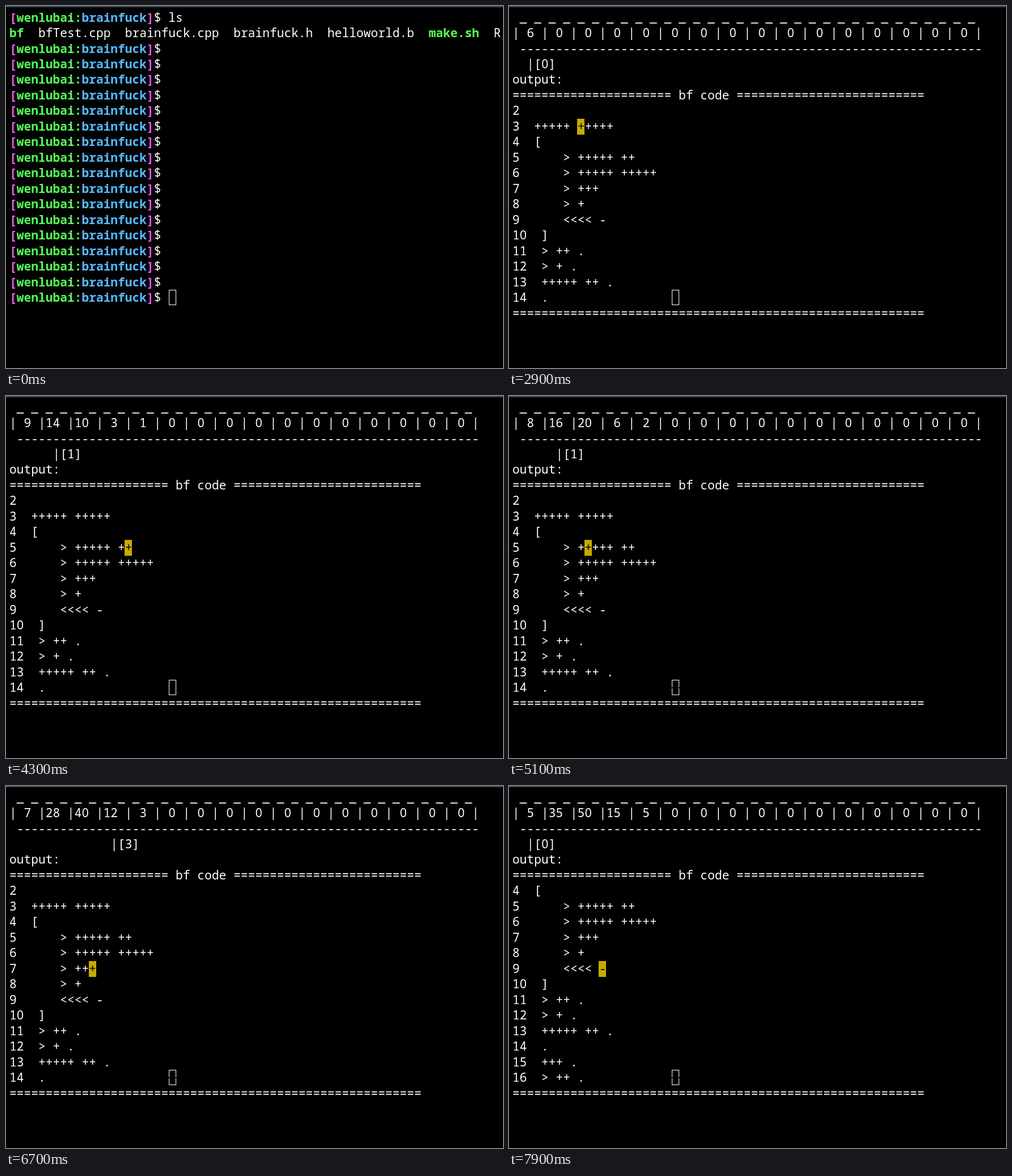
Recreate the animation shown at these times as an HTML page with a canvas. Size 876 by 639 pixels, loop 8 s.

```html
<!DOCTYPE html>
<html lang="en">
<head>
<meta charset="utf-8">
<title>Brainfuck visualizer</title>
<style>
html, body { margin: 0; width: 100%; height: 100%; overflow: hidden; background: #000; }
canvas { display: block; }
</style>
</head>
<body>
<canvas id="screen" width="876" height="639"></canvas>
<script>
const ctx = document.getElementById('screen').getContext('2d');
const LOOP = 8000, RUN_AT = 2800, FRAME = 100;
const COL = 12.74, ROW = 27.47, LEFT = 6, BASE = 27.6, SIZE = 21.2;
const WHITE = '#ffffff', GREEN = '#55ff55', BLUE = '#55bbff', PINK = '#ff55ff', GOLD = '#c8aa00';

// Program text; the first entry is line 2.
const FIRST = 2, VISIBLE = 13;
const code = [
  '',
  '+++++ +++++',
  '[',
  '    > +++++ ++',
  '    > +++++ +++++',
  '    > +++',
  '    > +',
  '    <<<< -',
  ']',
  '> ++ .',
  '> + .',
  '+++++ ++ .',
  '.',
  '+++ .',
  '> ++ .',
  '<< +++++ +++++ +++++ .'
];
const ops = code.flatMap((text, i) =>
  [...text].map((op, col) => ({ op, col, line: i + FIRST })).filter(o => o.op !== ' '));
const loopStart = ops.findIndex(o => o.op === '[');

const x = col => LEFT + col * COL;
const baseline = row => Math.round(BASE + row * ROW);

// Writes text on the character grid and returns the next column.
function put(row, col, text, color = WHITE, bold = false) {
  ctx.fillStyle = color;
  for (const ch of text) {
    // Plain zero without a slash.
    const family = ch === '0' ? '"Noto Sans", sans-serif' : '"Noto Sans Mono", monospace';
    ctx.font = `${bold ? 'bold ' : ''}${SIZE}px ${family}`;
    if (ch !== ' ') ctx.fillText(ch, x(col + 0.5), baseline(row));
    col++;
  }
  return col;
}

function prompt(row, command = '') {
  let col = put(row, 0, '[', PINK, true);
  col = put(row, col, 'wenlubai:', GREEN, true);
  col = put(row, col, 'brainfuck', BLUE, true);
  col = put(row, col, ']', PINK, true);
  put(row, col, '$ ' + command);
}

function cursor(broken) {
  ctx.strokeStyle = WHITE;
  ctx.lineWidth = 1;
  ctx.strokeRect(287.5, 501.5, 12, 26);
  if (broken) {
    ctx.fillStyle = '#000';
    ctx.fillRect(287, 514, 13, 2);
  }
}

function shell(t) {
  const typed = [[2300, './bf helloworld.b'], [2200, './bf he'], [2100, './bf h'],
    [1500, './bf'], [1000, './b'], [700, './'], [500, '.'], [0, '']];
  prompt(0, 'ls');
  put(1, 0, 'bf', GREEN, true);
  put(1, 4, 'bfTest.cpp  brainfuck.cpp  brainfuck.h  helloworld.b');
  put(1, 58, 'make.sh', GREEN, true);
  put(1, 67, 'R');
  for (let row = 2; row < 18; row++) prompt(row);
  prompt(18, typed.find(([from]) => t >= from)[1]);
  cursor(false);
}

function execute(steps) {
  const cells = Array(16).fill(0);
  let ptr = 0, pc = 0, current;
  while (steps-- > 0) {
    current = ops[pc++];
    switch (current.op) {
      case '+': cells[ptr]++; break;
      case '-': cells[ptr]--; break;
      case '>': ptr++; break;
      case '<': ptr--; break;
      case ']': if (cells[ptr]) pc = loopStart + 1;
    }
  }
  return { cells, ptr, current };
}

function machine(frame) {
  const { cells, ptr, current } = execute(Math.floor(3.02 + 3.19 * frame));
  put(0, 0, ' _'.repeat(32));
  put(1, 0, cells.map(v => '|' + (v > 9 ? `${v} ` : ` ${v} `)).join('') + '|');
  put(2, 1, '-'.repeat(64));
  put(3, 2 + 4 * ptr, `|[${ptr}]`);
  put(4, 0, 'output:');
  put(5, 0, '='.repeat(22) + ' bf code ' + '='.repeat(26));

  const top = Math.max(FIRST, current.line - 5);
  for (let i = 0; i < VISIBLE; i++) {
    const line = top + i, row = 6 + i;
    const label = line + '  ';
    put(row, 0, label + code[line - FIRST]);
    if (line === current.line) {
      const col = label.length + current.col;
      ctx.fillStyle = GOLD;
      ctx.fillRect(Math.floor(x(col)), baseline(row) - 21, 13, 28);
      put(row, col, current.op, '#000');
    }
  }
  put(19, 0, '='.repeat(57));
  // Text passing under the cursor wipes part of its outline.
  cursor(frame > 22);
}

function draw(now) {
  const t = now % LOOP;
  ctx.fillStyle = '#000';
  ctx.fillRect(0, 0, 876, 639);
  // Window edge
  ctx.fillStyle = '#0a3c5c';
  ctx.fillRect(0, 0, 876, 1);
  ctx.fillStyle = '#5a5a5a';
  ctx.fillRect(0, 1, 875, 1);
  ctx.textAlign = 'center';
  if (t < RUN_AT) shell(t);
  else machine(Math.floor((t - RUN_AT) / FRAME));
  requestAnimationFrame(draw);
}
requestAnimationFrame(draw);
</script>
</body>
</html>
```
